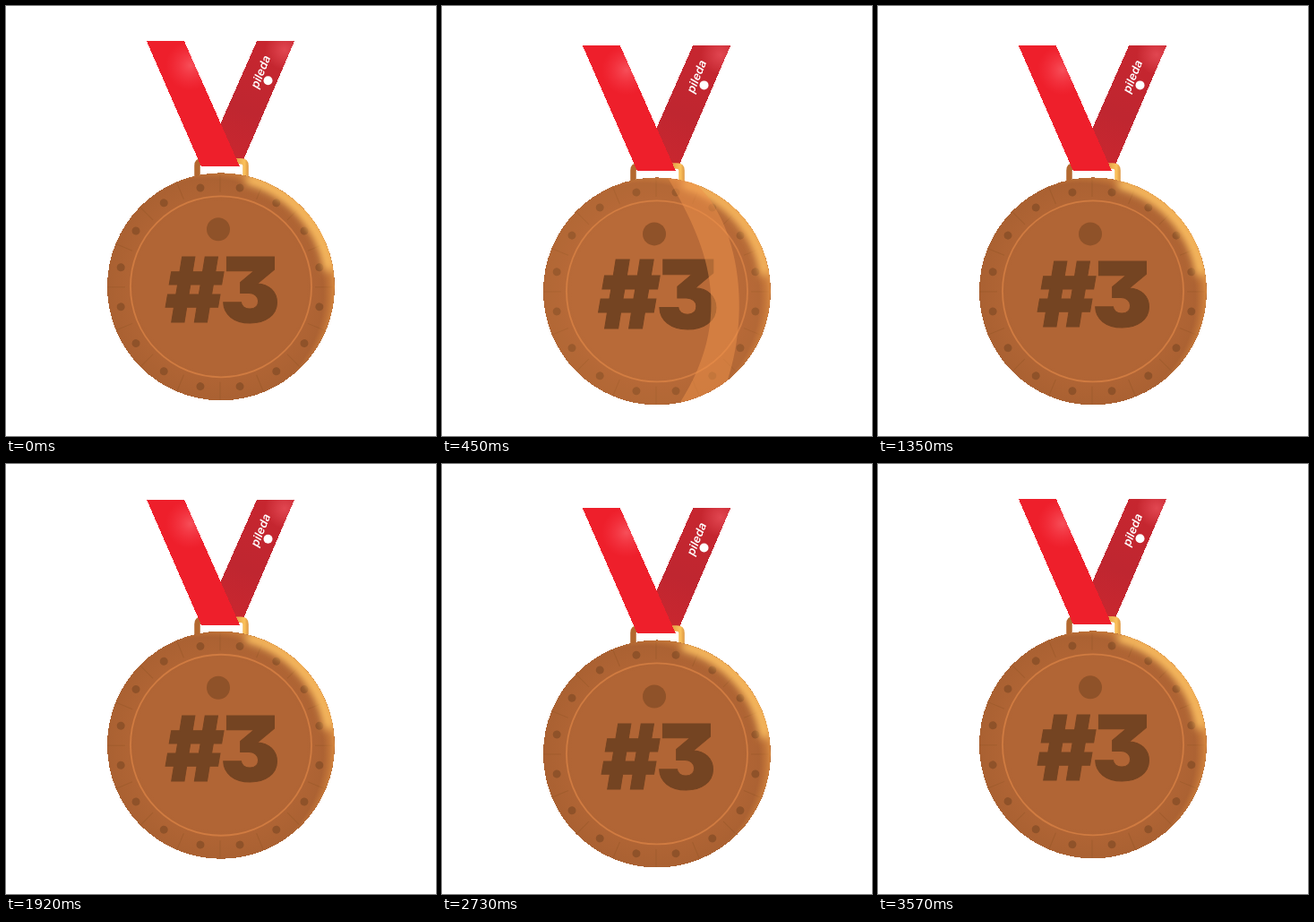
Write an HTML page that moves like this. It is 480 px wide and 480 px high and loops after 3.6 s.

```html
<!DOCTYPE html>
<html lang="en">
<head>
<meta charset="utf-8">
<title>Bronze medal</title>
<style>
  html, body { margin: 0; width: 100%; height: 100%; overflow: hidden; background: #fff; }
  svg { display: block; width: 100vw; height: 100vh; }
  .crisp { shape-rendering: crispEdges; }
  .rank { font: 900 100px Inter, sans-serif; font-feature-settings: "cv09"; text-anchor: middle; fill: #744422; stroke: #744422; }
  .brand { font: 600 13px Inter, sans-serif; fill: #fff; }
</style>
</head>
<body>
<svg viewBox="0 0 480 480">
  <defs>
    <radialGradient id="bronze" gradientUnits="userSpaceOnUse" cx="240" cy="313" r="127">
      <stop offset=".75" stop-color="#b16535"/>
      <stop offset="1" stop-color="#aa6132"/>
    </radialGradient>
    <radialGradient id="rim" gradientUnits="userSpaceOnUse" cx="226" cy="321" r="144">
      <stop offset=".89" stop-color="#d9853c" stop-opacity="0"/>
      <stop offset="1" stop-color="#efa04a" stop-opacity=".85"/>
    </radialGradient>
    <linearGradient id="buckle" gradientUnits="userSpaceOnUse" x1="210" y1="0" x2="271" y2="0">
      <stop offset=".1" stop-color="#b3682f"/>
      <stop offset=".7" stop-color="#d98f3c"/>
      <stop offset=".92" stop-color="#fbc25c"/>
      <stop offset="1" stop-color="#dc9440"/>
    </linearGradient>
    <linearGradient id="back" gradientUnits="userSpaceOnUse" x1="300" y1="39" x2="250" y2="170">
      <stop stop-color="#c7262f"/>
      <stop offset=".6" stop-color="#bf2630"/>
      <stop offset="1" stop-color="#c9272f"/>
    </linearGradient>
    <radialGradient id="backGlow" gradientUnits="userSpaceOnUse" cx="311" cy="49" r="22">
      <stop stop-color="#ef5863" stop-opacity=".65"/>
      <stop offset="1" stop-color="#ef5863" stop-opacity="0"/>
    </radialGradient>
    <radialGradient id="frontGlow" gradientUnits="userSpaceOnUse" cx="206" cy="66" r="28">
      <stop stop-color="#ff8088" stop-opacity=".5"/>
      <stop offset="1" stop-color="#ff5060" stop-opacity="0"/>
    </radialGradient>
    <filter id="soft" x="-30%" y="-30%" width="160%" height="160%"><feGaussianBlur stdDeviation="5"/></filter>
    <clipPath id="disc"><circle cx="240" cy="313" r="127"/></clipPath>
    <path id="backStrap" d="M280 39H322L264 174L240 179L231 150Z"/>
    <path id="frontStrap" d="M157 39H199L261 179H218Z"/>
  </defs>

  <g id="medal">
    <g class="crisp">
      <use href="#backStrap" fill="url(#back)"/>
      <use href="#backStrap" fill="url(#backGlow)"/>
    </g>
    <path d="M213.500 190V178Q213.500 173 219 173H262Q267.500 173 267.500 178V190" fill="none" stroke="url(#buckle)" stroke-width="6.500"/>
    <text class="brand" transform="translate(281 93) rotate(-68) skewX(-8)">pileda</text>
    <circle cx="292.500" cy="83" r="5" fill="#fff"/>
    <g class="crisp">
      <use href="#frontStrap" fill="#ee1f2b"/>
      <use href="#frontStrap" fill="url(#frontGlow)"/>
      <circle cx="240" cy="313" r="127" fill="url(#bronze)"/>
    </g>

    <g clip-path="url(#disc)">
      <g id="studs" fill="#8f5229" stroke="#985829" transform="translate(-1 .5)"></g>
      <circle cx="240" cy="313" r="101" fill="none" stroke="#d07b41" stroke-width="1.800"/>
      <circle cx="240" cy="313" r="127" fill="url(#rim)"/>
      <path d="M268 193A123 123 0 0 1 361 295" fill="none" stroke="#ffc565" stroke-width="10" filter="url(#soft)"/>
      <circle id="flash" cx="240" cy="313" r="127" fill="#e08a4c"/>
    </g>
    <circle cx="237" cy="249" r="13" fill="#8f5229"/>
    <g id="rank" class="rank">
      <text x="210.500" y="353">#</text>
      <text x="272.500" y="353">3</text>
    </g>
    <g clip-path="url(#disc)">
      <path id="shine" fill="#f0914a" fill-opacity=".5" d="M252 186C285 245 336 330 264 440H308C350 350 335 230 275 186Z"/>
    </g>
  </g>
</svg>
<script>
  const LOOP = 3600, STEP = 30, BOB = 1800, PULSE = 1350;
  const el = id => document.getElementById(id);
  const medal = el('medal'), rank = el('rank'), shine = el('shine'), flash = el('flash');

  // Studs around the rim, with a faint seam between each pair.
  el('studs').innerHTML = Array.from({ length: 16 }, (_, i) =>
    `<g transform="rotate(${i * 22.5} 240 313)">
      <path d="M240 187V207" stroke-opacity=".55"/>
      <circle cx="240" cy="200" r="4.500" stroke="none" transform="rotate(11.25 240 313)"/>
    </g>`).join('');

  function draw(now) {
    const t = Math.floor(now % LOOP / STEP) * STEP;
    const drop = 0.3 + 5.1 * (1 - Math.cos(2 * Math.PI * t / BOB));
    const phase = Math.min(t / PULSE, 1);
    const scale = 1 + 0.063 * Math.sin(2 * Math.PI * phase);

    medal.setAttribute('transform', `translate(0 ${drop})`);
    rank.setAttribute('transform', `translate(240.5 317) scale(${scale}) translate(-240.5 -317)`);
    shine.setAttribute('transform', `translate(${(t - 450) * 0.55} 0)`);
    flash.setAttribute('opacity', 0.16 * Math.sin(Math.PI * phase));
    requestAnimationFrame(draw);
  }
  draw(performance.now());
</script>
</body>
</html>
```
